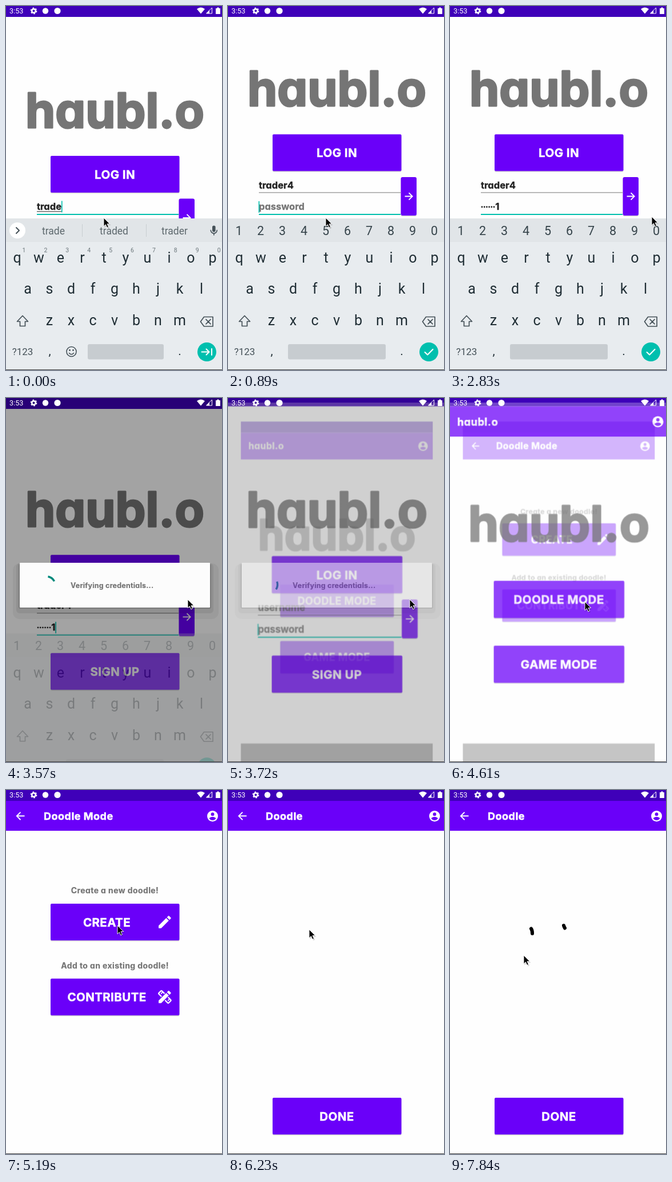
An HTML page for the animation above (7990 ms loop, 378 by 634 pixels).

```html
<!DOCTYPE html>
<html lang="en">
<head>
<meta charset="utf-8">
<title>Drawing app login</title>
<style>
  html, body { margin: 0; width: 100%; height: 100%; overflow: hidden; background: #fefefe; }
  svg { display: block; width: 100vw; height: 100vh; }
  text { white-space: pre; }
  .b { font-family: Inter, "Noto Sans", sans-serif; font-weight: 700; font-feature-settings: "cv11";
       stroke: currentColor; stroke-width: .5; stroke-linejoin: round; fill: currentColor; }
  .k { font-family: Roboto, sans-serif; }
  .mid { text-anchor: middle; }
  .logo { font-size: 84px; stroke-width: 3; color: #757575; }
  .cap { font-size: 20.5px; letter-spacing: .4px; color: #fff; }
  .title { font-size: 18px; letter-spacing: .5px; color: #fff; }
  .note { font-size: 14px; letter-spacing: .4px; stroke-width: .2; color: #757575; }
  .field { font-size: 16.5px; stroke-width: .3; color: #222; }
  .line { fill: none; stroke-linecap: round; stroke-linejoin: round; }
</style>
</head>
<body>
<svg id="stage" viewBox="0 0 378 634" preserveAspectRatio="none"></svg>
<script>
const LOOP = 7990;
const PURPLE = '#6a00f9', DARK = '#3f00b9', TEAL = '#00bfae', INK = '#1f2d34', SOFT = '#5d686d';
const APP = 'haubl.o', USER = 'trader4', SECRET = 'sunday1';

// Moments at which the picture is refreshed.
const STEPS = [0, 150, 450, 740, 890, 1340, 1490, 1640, 1940, 2080, 2230,
  2830, 2970, 3120, 3270, 3420, 3570, 3720, 3870,
  4020, 4170, 4310, 4460, 4610, 4760, 4900, 5050, 5190,
  5640, 5790, 5940, 6090, 6230, 6380, 6520, 6670,
  6810, 6960, 7100, 7250, 7400, 7540, 7690, 7840];

// Pointer path: time, x, y.
const POINTER = [[0, 171, 369], [2690, 171, 369], [2830, 353, 367], [2970, 330, 353], [3120, 318, 351],
  [4020, 318, 351], [4310, 262, 357], [4460, 236, 355], [4900, 236, 355], [5050, 198, 246],
  [5190, 195, 236], [5940, 195, 236], [6230, 142, 243], [6520, 142, 241], [6810, 144, 250],
  [7250, 199, 236], [7540, 201, 241], [7840, 129, 288]];

const clamp = v => Math.max(0, Math.min(1, v));
const rect = (x, y, w, h, fill, r = 0, more = '') =>
  `<rect x="${x}" y="${y}" width="${w}" height="${h}" rx="${r}" fill="${fill}" ${more}/>`;
const text = (x, y, cls, s, more = '') => `<text x="${x}" y="${y}" class="${cls}" ${more}>${s}</text>`;
const line = (d, color, w, more = '') =>
  `<path d="${d}" class="line" stroke="${color}" stroke-width="${w}" ${more}/>`;
const dot = (x, y, r, fill) => `<circle cx="${x}" cy="${y}" r="${r}" fill="${fill}"/>`;
const key = (x, y, size, s, fill = INK, more = '') =>
  text(x, y, 'k mid', s, `font-size="${size}" fill="${fill}" ${more}`);

const button = (y, label, x = 190.5) =>
  rect(78, y + 1.5, 225.5, 64, '#000', 2, 'opacity=".16"') +
  rect(78, y, 225.5, 64, PURPLE, 2) + text(x, y + 39.5, 'b cap mid', label);

const account = `<g transform="translate(361.5 45.5)">${dot(0, 0, 9.5, '#fff')}${dot(0, -3.3, 2.9, PURPLE)}
  <path d="M-5.7 4.2C-5.6 2.3-1.9 1.3 0 1.3S5.6 2.3 5.7 4.2A6.9 6.9 0 0 1-5.7 4.2Z" fill="${PURPLE}"/></g>`;
const back = line('M32.5 45.3H19M25.5 38.6L18.8 45.3L25.5 52', '#fff', 1.9, 'style="stroke-linecap:butt;stroke-linejoin:miter"');
const bar = (title, x, extra = '') =>
  rect(0, -3, 381, 22, DARK) + rect(0, 19, 381, 52, PURPLE) +
  text(x, 52, 'b title', title) + extra + account;
const navBar = rect(0, 633, 381, 110, '#383838');
const pencil = `<path d="M3 17.25V21h3.75L17.81 9.94l-3.75-3.75zM20.71 7.04a1 1 0 0 0 0-1.41l-2.34-2.34a1 1 0 0 0-1.41 0l-1.83 1.83 3.75 3.75z" fill="#fff"/>`;

// A page is split so its bar and its body can fade apart.
const page = (id, soft, body) =>
  `<g id="${id}"><g class="soft">${soft}</g><g class="body">${body}</g></g>`;

const login = page('login', rect(0, -3, 381, 22, DARK), `<g id="form">
  ${text(190.5, 227, 'b logo mid', APP)}
  ${button(276.5, 'LOG IN')}
  ${text(54, 370.5, 'b field', '', 'id="user"')}
  <g id="userMark">${rect(54, 373, 1, 1, '#222', 0, 'id="spell"')}</g>
  ${rect(54, 377.5, 248, 1, '#777', 0, 'id="userLine"')}
  ${text(54, 408, 'b field', '', 'id="pass"')}
  <g id="dots">${[0, 1, 2, 3, 4, 5].map(i => dot(56 + 4.2 * i, 403, 1.4, '#222')).join('')}</g>
  ${rect(54, 415, 248, 1, '#777', 0, 'id="passLine"')}
  ${rect(54, 355, 1.6, 20, TEAL, 0, 'id="caret"')}
  ${rect(302.5, 352.5, 27.5, 67, '#000', 3, 'opacity=".14"')}${rect(302.5, 351, 27.5, 67, PURPLE, 3)}
  ${line('M309.5 384.5H322.5M316.5 378.3L322.7 384.5L316.5 390.7', '#fff', 1.8, 'style="stroke-linecap:butt;stroke-linejoin:miter"')}
  ${button(447.5, 'SIGN UP')}
</g>`);

const home = page('home', bar(APP, 15) + navBar + text(190.5, 251, 'b logo mid', APP),
  button(319, 'DOODLE MODE') + button(430.5, 'GAME MODE'));

const mode = page('mode', bar('Doodle Mode', 66, back) + navBar +
  text(190.5, 179.5, 'b note mid', 'Create a new doodle!') +
  text(190.5, 310.5, 'b note mid', 'Add to an existing doodle!'),
  button(198, 'CREATE', 176.5) + `<g transform="translate(263.5 215.5) scale(1.2)">${pencil}</g>` +
  button(328.5, 'CONTRIBUTE', 176.5) + `<g transform="translate(263.5 346) scale(1.2)">
    <rect x="1.9" y="8.9" width="20.2" height="6.2" rx="1" fill="none" stroke="#fff" stroke-width="1.9" transform="rotate(45 12 12)"/>
    ${line('M8.2 5.8L6.8 7.2M18.2 15.8L16.8 17.2', '#fff', 1.4)}
    <g stroke="${PURPLE}" stroke-width="2" paint-order="stroke">${pencil.replace('/>', ' paint-order="stroke"/>')}</g></g>`);

const canvas = page('canvas', bar('Doodle', 66, back) + navBar, button(536, 'DONE') +
  line('M142 241.500Q144.300 245 144 250', '#000', 6, 'id="left" pathLength="1"') +
  line('M199 236Q199.500 238.200 201 240.500', '#000', 6, 'id="right" pathLength="1"'));

const letters = (row, x, y) => [...row].map((c, i) => key(x + 38 * i, y, 25, c)).join('');
const digits = [...'1234567890'];
const keyboard = `<g id="keyboard">
  ${rect(0, 370, 378, 263, '#e8ecef')}${rect(0, 370, 378, 41, '#e1e5e8')}
  ${letters('qwertyuiop', 19.5, 447)}${letters('asdfghjkl', 38, 501)}${letters('zxcvbnm', 76, 556)}
  ${line('M29 539.500L38.500 549.500H33.500V557.500H24.500V549.500H19.500Z', '#455158', 1.7)}
  ${line('M346.500 541.500H362V558H346.500L340.500 549.800ZM350 545.800L358 553.800M358 545.800L350 553.800', '#455158', 1.7)}
  ${key(29, 608, 17, '?123', '#455158')}${key(76.5, 608, 21, ',')}${key(304, 608, 21, '.')}
  ${rect(143, 589, 133, 26.5, '#c7ccd0', 3, 'id="space"')}
  ${dot(351.500, 602.500, 16.5, TEAL)}
  <g id="words">
    ${dot(20, 391, 14, '#fff')}${line('M18 386L23 391L18 396', '#455158', 2)}
    ${[83, 189, 295].map(x => key(x, 397.5, 17.5, '', SOFT, 'data-word')).join('')}
    ${rect(133, 380, 1, 22, '#c9cfd2')}${rect(245, 380, 1, 22, '#c9cfd2')}
    ${rect(361, 382.5, 5.6, 11, '#455158', 2.8)}${line('M358.300 390.500a5.500 5.500 0 0 0 11 0M363.800 396V399', '#455158', 1.6)}
    ${digits.map((d, i) => key(31.5 + 37.9 * i, 428.5, 10.5, d, '#6b767b')).join('')}
    <circle cx="114.500" cy="602" r="8.500" fill="none" stroke="#455158" stroke-width="1.6"/>
    ${dot(111.5, 599.5, 1.4, '#455158')}${dot(117.5, 599.5, 1.4, '#455158')}${line('M110.500 604.500Q114.500 609 118.500 604.500', '#455158', 1.6)}
    ${line('M342.500 602.500H355M350.500 597.500L355.500 602.500L350.500 607.500M360 597V608', '#fff', 2)}
  </g>
  <g id="numbers">
    ${digits.map((d, i) => key(19 + 38 * i, 399, 21.5, d, '#35434a')).join('')}
    ${line('M344.500 603L349.200 607.500L358.500 598', '#fff', 2.1)}
  </g></g>`;

const dialog = `<g id="dim">${rect(0, 0, 378, 634, '#000')}</g>
  <g id="dialog">${rect(12, 288, 360, 97, '#000', 12, 'opacity=".05"')}${rect(18, 288, 345, 87, '#000', 6, 'opacity=".07"')}
  ${rect(22, 289, 337, 78, '#000', 3, 'opacity=".15"')}${rect(24, 287, 333, 78, '#fcfcfc', 1)}
  <path id="spin" d="M73.500 311A15.500 15.500 0 0 1 84.500 319.200" fill="none" stroke="#00897b" stroke-width="3.4"/>
  ${text(113, 330.5, 'b note', 'Verifying credentials...', 'style="font-size:12.5px;letter-spacing:.2px"')}</g>`;

const status = `<g>
  ${text(6, 13, 'k', '3:53', 'font-size="12.7" fill="#fff"')}
  <circle cx="48.500" cy="8.500" r="3.300" fill="none" stroke="#fff" stroke-width="2.600"/>
  <circle cx="48.500" cy="8.500" r="5" fill="none" stroke="#fff" stroke-width="1.800" stroke-dasharray="2.600 2.636"/>
  ${dot(69, 8.5, 5.2, '#fff')}${dot(90, 8.5, 5.6, '#fff')}
  <path d="M341 13.500L334 5.200Q341 -.4 348 5.200Z" fill="#fff"/>
  <path d="M360.500 3V13H350.500Z" fill="none" stroke="#fff"/><path d="M356 7.500V13H350.500Z" fill="#fff"/>
  <path d="M367 4H369.500V2.500H372.500V4H375V14H367Z" fill="#fff"/></g>`;

const pointer = `<g id="pointer"><path d="M1.500 2V17L5 13.700 7.500 19 10 18 7.700 12.700H12.500Z" opacity=".18"/>
  <path d="M0 0V14.800L3.400 11.600 5.800 17 8.400 15.900 6 10.600H10.700Z" fill="#000" stroke="#fff" stroke-width=".9"/></g>`;

const stage = document.getElementById('stage');
stage.innerHTML = rect(0, 0, 378, 634, '#fefefe') + rect(0, 0, 378, 8, DARK) +
  canvas + mode + home + login + keyboard + dialog +
  rect(0, 633, 378, 1, '#444') + status + pointer;

const $ = id => document.getElementById(id);
const set = (el, attrs) => { for (const k in attrs) el.setAttribute(k, attrs[k]); };
const show = (el, on) => { el.style.display = on ? '' : 'none'; };
const words = [...stage.querySelectorAll('[data-word]')];

// Each page grows in below the one that swells and fades away.
const PAGES = [['login', -Infinity], ['home', 3640], ['mode', 4530], ['canvas', 5560]];

function placePages(t) {
  PAGES.forEach(([id, start], i) => {
    const enter = clamp((t - start) / 307);
    const leave = i < 3 ? clamp((t - PAGES[i + 1][1]) / 307) : 0;
    const el = $(id), s = enter < 1 ? .84 + .16 * enter : 1 + .05 * leave;
    show(el, enter > 0 && leave < 1);
    set(el, { transform: `translate(190.5 369) scale(${s}) translate(-190.5 -369)`, opacity: 1 - leave });
    set(el.querySelector('.soft'), { opacity: clamp(enter < 1 ? enter * 1.1 : 1) });
    set(el.querySelector('.body'), { opacity: clamp(enter * 1.34) });
  });
}

function placeForm(t) {
  const gone = clamp((t - 3330) / 340);
  const shift = t < 740 ? -15.5 : t < 890 ? -34 : -53 * (1 - gone) ** 2.3;
  const cleared = t >= 3720, onPass = t >= 740;
  const typed = t < 150 ? 5 : t < 450 ? 6 : 7;
  const count = cleared ? 0 : [1340, 1490, 1490, 1640, 1940, 2080, 2230].filter(k => t >= k).length;
  const user = $('user'), pass = $('pass');
  set($('form'), { transform: `translate(0 ${shift})` });

  user.textContent = cleared ? 'username' : USER.slice(0, typed);
  user.style.color = cleared ? '#757575' : '';
  const width = user.getComputedTextLength();
  set($('spell'), { width });
  show($('userMark'), !onPass);
  set($('userLine'), { fill: onPass ? '#777' : TEAL, height: onPass ? 1 : 2 });

  pass.textContent = count ? SECRET[count - 1] : 'password';
  pass.style.color = count ? '' : '#757575';
  set(pass, { x: 54 + 4.2 * Math.max(0, count - 1) });
  [...$('dots').children].forEach((d, i) => show(d, i < count - 1));
  set($('passLine'), { fill: onPass ? TEAL : '#777', height: onPass ? 2 : 1 });

  const end = count ? 54 + 4.2 * (count - 1) + pass.getComputedTextLength() : 53.5;
  set($('caret'), onPass ? { x: end, y: 393 } : { x: 54 + width, y: 355 });
  show($('caret'), t < 2830 || t >= 3120);

  set($('keyboard'), { transform: `translate(0 ${57 * gone})`, opacity: 1 - gone });
  show($('words'), !onPass);
  show($('numbers'), onPass);
  set($('space'), onPass ? { x: 105, width: 171 } : { x: 143, width: 133 });
  const offers = [['trade', 'traded', 'trader'], ['trader', 'traders', 'traded'], [USER, 'trader 4', 'traders']][typed - 5];
  words.forEach((w, i) => { w.textContent = offers[i]; });
}

function pointerAt(t) {
  const i = POINTER.findIndex(p => p[0] > t);
  if (i < 0) return POINTER[POINTER.length - 1].slice(1);
  const a = POINTER[i - 1], b = POINTER[i], f = (t - a[0]) / (b[0] - a[0]);
  return [a[1] + (b[1] - a[1]) * f, a[2] + (b[2] - a[2]) * f];
}

function ink(id, t, from, to) {
  const f = clamp((t - from) / (to - from));
  show($(id), t >= from);
  set($(id), { 'stroke-dasharray': f < 1 ? `${f} 2` : 'none' });
}

function draw(t) {
  placePages(t);
  placeForm(t);
  const fade = Math.min(clamp((t - 3120) / 150), clamp((3870 - t) / 300));
  set($('dim'), { opacity: .36 * fade });
  set($('dialog'), { opacity: fade });
  set($('spin'), { transform: `rotate(${(t - 3570) * .4} 72 326)` });
  ink('left', t, 6520, 6810);
  ink('right', t, 7250, 7540);
  set($('pointer'), { transform: `translate(${pointerAt(t)})` });
}

let shown = -1;
const began = performance.now();
function tick() {
  const now = (performance.now() - began) % LOOP;
  const t = STEPS.filter(s => s <= now).pop();
  if (t !== shown) draw(shown = t);
  requestAnimationFrame(tick);
}
tick();
</script>
</body>
</html>
```
